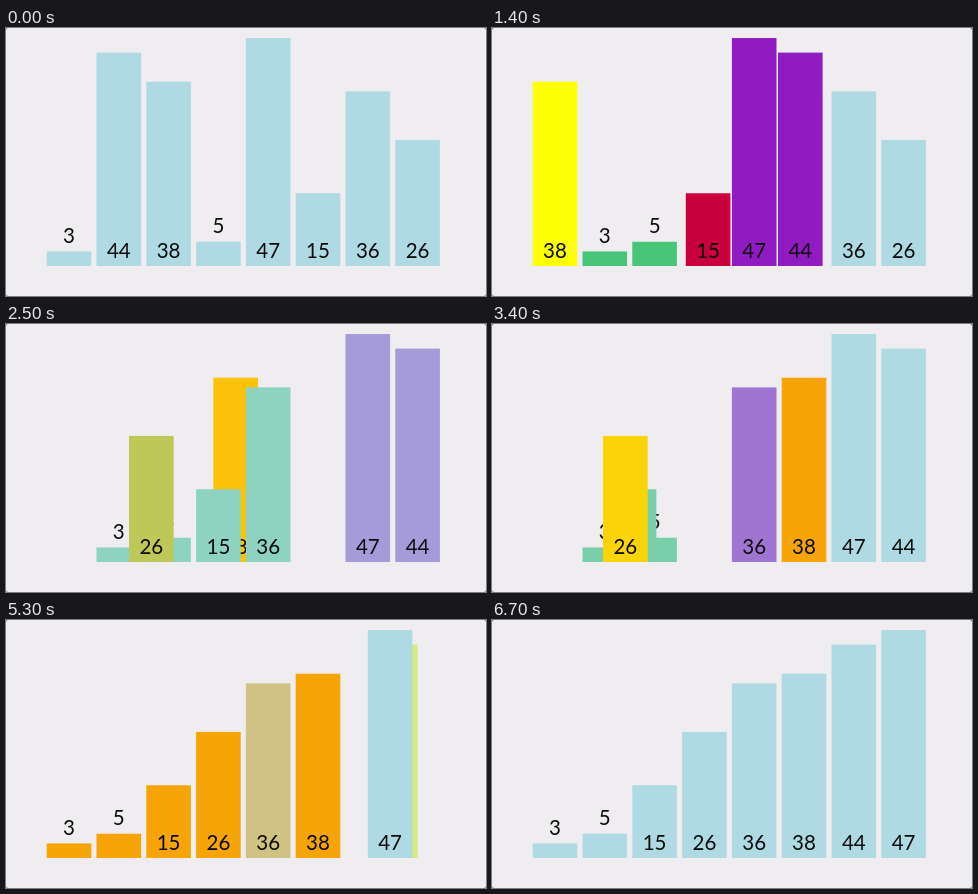
Write an HTML page that moves like this. It is 480 px wide and 268 px high and loops after 6.9 s.

```html
<!DOCTYPE html>
<html lang="en">
<head>
<meta charset="utf-8">
<title>Randomised quicksort</title>
<style>
  html, body { margin: 0; width: 100%; height: 100%; overflow: hidden; background: #777; }
  svg { display: block; width: 100%; height: 100%; }
  text { font: 20.5px Lato, "Open Sans", sans-serif; text-anchor: middle; fill: #0c0c0c; }
</style>
</head>
<body>
<svg id="stage" viewBox="0 0 480 268">
  <rect width="480" height="268" rx="2.5" fill="#efedf0"/>
</svg>
<script>
const LOOP = 6900, FRAME = 100;
const BASE = 238, UNIT = 4.85, LEFT = 40.7, PITCH = 49.8, WIDTH = 44.6;
const COLORS = {
  blue: [176, 218, 227], yellow: [255, 255, 5], green: [72, 197, 120], red: [200, 0, 60],
  purple: [143, 27, 193], orange: [247, 164, 9], amber: [248, 202, 73]
};
const values = [3, 44, 38, 5, 47, 15, 36, 26];
const stage = document.getElementById('stage');

function add(parent, tag, attrs) {
  const node = document.createElementNS('http://www.w3.org/2000/svg', tag);
  for (const name in attrs) node.setAttribute(name, attrs[name]);
  return parent.appendChild(node);
}

const bars = values.map(value => {
  const group = add(stage, 'g', {});
  const height = value * UNIT;
  const rect = add(group, 'rect', { y: BASE - height, width: WIDTH, height });
  const label = add(group, 'text', { x: WIDTH / 2, y: value < 10 ? BASE - height - 8.5 : 229.5 });
  label.textContent = value;
  return { value, group, rect };
});

// Each state holds every bar's slot and colour; bars ease from one state to the next.
let current = {};
values.forEach((value, slot) => current[value] = { slot, color: 'blue' });
const states = [{ end: 0, bars: current }];

function step(duration, paint = {}, swap) {
  const next = {};
  for (const v of values) next[v] = { ...current[v] };
  for (const color in paint) for (const v of paint[color]) next[v].color = color;
  if (swap) {
    const [a, b] = swap;
    [next[a].slot, next[b].slot] = [next[b].slot, next[a].slot];
  }
  states.push({ start: states[states.length - 1].end,
                end: states[states.length - 1].end + duration, bars: next });
  current = next;
}

function phase(duration, ...steps) {
  for (const [paint, swap] of steps) step(duration, paint, swap);
}

// Partition around 38
phase(143,
  [{ yellow: [38] }, [38, 3]],
  [],
  [{ red: [44] }],
  [{ purple: [44], red: [3] }],
  [{}, [3, 44]],
  [{ green: [3], red: [5] }],
  [{}, [5, 44]],
  [{ green: [5], red: [47] }],
  [{ purple: [47], red: [15] }],
  [{}, [15, 44]]);
phase(163,
  [{ green: [15], red: [36] }],
  [{}, [36, 47]],
  [{ green: [36], red: [26] }],
  [{}, [26, 44]],
  [{ green: [26] }],
  [],
  [{ orange: [38], amber: [26], blue: [3, 5, 15, 36, 47, 44] }, [38, 26]]);
// Around 26
phase(151,
  [{ yellow: [26], red: [3] }],
  [{ green: [3], red: [5] }],
  [{ green: [5], red: [15] }],
  [{ green: [15], red: [36] }],
  [{ purple: [36] }],
  [{ orange: [26], blue: [3, 5, 15, 36] }, [26, 15]]);
// Around 15
phase(154,
  [{ yellow: [15] }],
  [{ red: [3] }],
  [{ green: [3], red: [5] }],
  [{ green: [5] }],
  [{ orange: [15], blue: [3, 5] }, [15, 5]],
  [{ yellow: [5] }]);
// Around 5, then the pivot pick for the last pair
phase(164,
  [{ red: [3] }],
  [{ green: [3] }],
  [{ orange: [5], blue: [3] }, [5, 3]],
  [{ orange: [3] }],
  [],
  [{ orange: [36], yellow: [44] }, [44, 47]]);
phase(150,
  [{ red: [47] }],
  [{ purple: [47] }],
  [{ orange: [44], blue: [47] }],
  [{ orange: [47] }],
  [],
  [{ blue: values }]);

const ease = t => t < 0.5 ? 4 * t ** 3 : 1 - 4 * (1 - t) ** 3;
const mix = (a, b, k) => a + (b - a) * k;

function draw(time) {
  let i = states.findIndex((s, n) => n > 0 && time < s.end);
  if (i < 0) i = states.length - 1;
  const { start, end, bars: to } = states[i];
  const from = states[i - 1].bars;
  const k = ease(Math.min(1, (time - start) / (end - start)));
  for (const { value, group, rect } of bars) {
    const a = from[value], b = to[value];
    const rgb = COLORS[a.color].map((c, n) => Math.round(mix(c, COLORS[b.color][n], k)));
    group.setAttribute('transform', `translate(${LEFT + PITCH * mix(a.slot, b.slot, k)} 0)`);
    rect.setAttribute('fill', `rgb(${rgb})`);
  }
}

const origin = performance.now();
function tick() {
  const time = (performance.now() - origin) % LOOP;
  draw(Math.floor(time / FRAME) * FRAME);
  requestAnimationFrame(tick);
}
tick();
</script>
</body>
</html>
```
